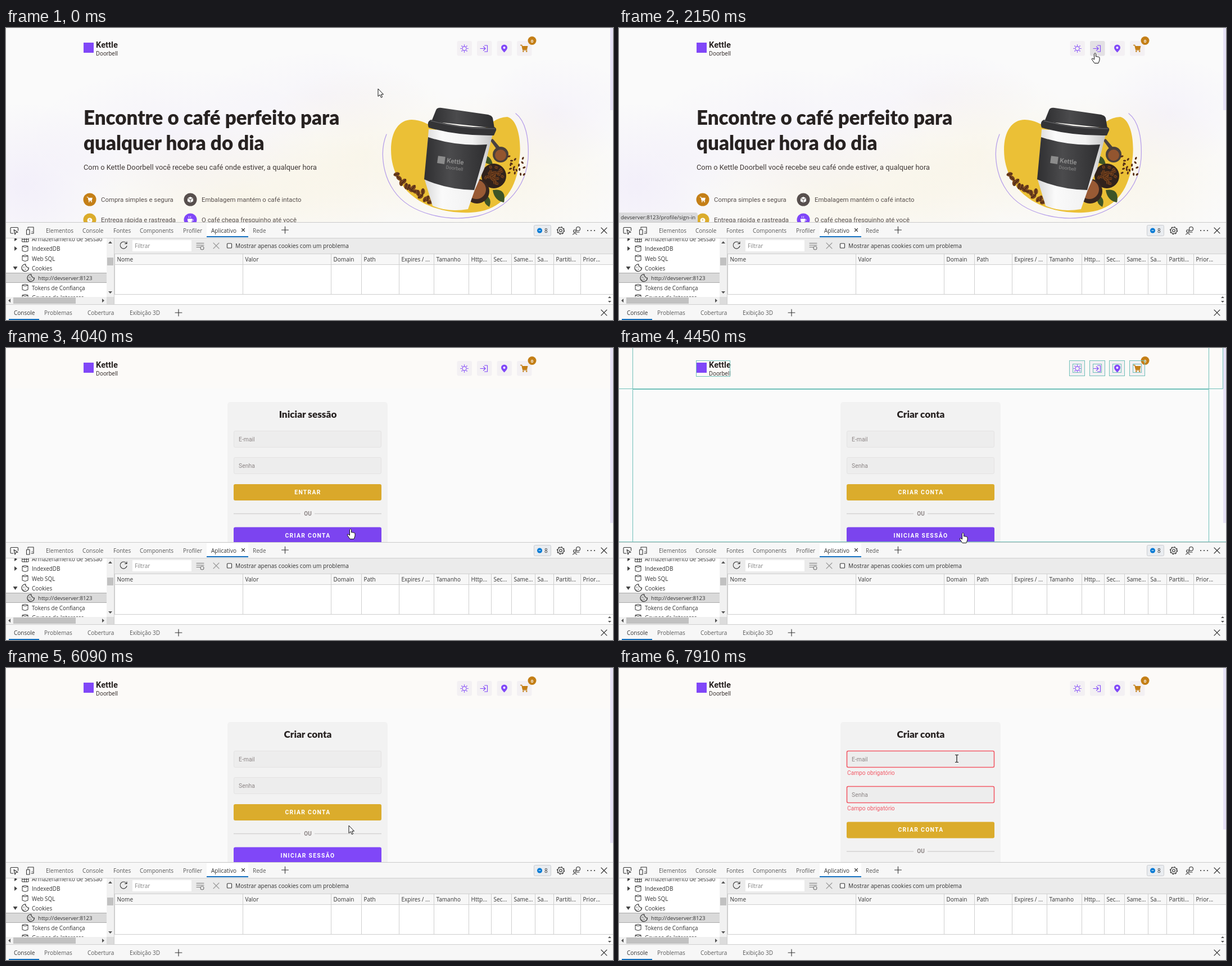
An HTML page that plays this animation: 1080x519 px, repeating every 8 s.

```html
<!DOCTYPE html>
<html lang="pt-BR">
<head>
<meta charset="utf-8">
<title>Iniciar sessão</title>
<style>
html, body { margin: 0; width: 100%; height: 100%; overflow: hidden; background: #fafafa; }
svg { display: block; width: 100%; height: 100%; }
text { font-family: Roboto, sans-serif; white-space: pre; }
.title { font-family: Lato, sans-serif; font-weight: 900; fill: #272221; }
.ui { font-family: "Open Sans", "Noto Sans", sans-serif; fill: #333; }
.btn { font-weight: 700; letter-spacing: 1.3px; text-anchor: middle; fill: #fff; }
.mid { text-anchor: middle; }
.line { fill: none; stroke-linecap: round; stroke-linejoin: round; }
</style>
</head>
<body>
<svg viewBox="0 0 1080 519">
<defs>
  <radialGradient id="violet"><stop stop-color="#8047f8"/><stop offset="1" stop-color="#8047f8" stop-opacity="0"/></radialGradient>
  <radialGradient id="yellow"><stop stop-color="#f0c030"/><stop offset="1" stop-color="#f0c030" stop-opacity="0"/></radialGradient>
  <linearGradient id="paper"><stop stop-color="#d9d9d9"/><stop offset=".25" stop-color="#fafafa"/><stop offset=".7" stop-color="#f2f2f2"/><stop offset="1" stop-color="#c4c4c4"/></linearGradient>
  <linearGradient id="dark"><stop stop-color="#2f2f31"/><stop offset=".4" stop-color="#4b4b4d"/><stop offset="1" stop-color="#2e2e30"/></linearGradient>
  <clipPath id="treeClip"><path d="M0 374H179V478H0Z"/></clipPath>
  <g id="cart"><path class="line" d="M-6.5-6h2.3l2 8.5H4.8" stroke="currentColor" stroke-width="1.4"/><path d="M-4-4.5H6.5L5 1.7H-2.6Z" fill="currentColor"/><circle cx="-1.7" cy="5" r="1.3" fill="currentColor"/><circle cx="4.2" cy="5" r="1.3" fill="currentColor"/></g>
</defs>

<rect width="1080" height="346" fill="#fafafa"/>

<g id="home">
  <g id="glow"></g>
  <text class="title" x="138" y="171.500" font-size="34.900">Encontre o café perfeito para</text>
  <text class="title" x="138" y="216.500" font-size="34.900">qualquer hora do dia</text>
  <text x="138" y="252" font-size="12.850" fill="#403937">Com o Kettle Doorbell você recebe seu café onde estiver, a qualquer hora</text>
  <g id="perks"></g>
  <use href="#cart" transform="translate(149 305) scale(.75)" color="#fff"/>
  <path d="M328 300l5 2.500v5.500l-5 2.500-5-2.500v-5.500z" fill="#fff"/>
  <path class="line" d="M323.500 302.700l4.500 2.300 4.500-2.300M328 305v5" stroke="#574f4d"/>
  <circle cx="149" cy="342" r="4.500" fill="#fff"/><path d="M147.500 335.500h3M149 339.500v3" stroke="#dbac2c" stroke-width="1.300"/>
  <path d="M323 339h8v3q-1 4-4 4t-4-4z" fill="#fff"/><path class="line" d="M331 340q3 0 2 2t-3 1.500M325.500 337v-2M328.500 337v-2" stroke="#fff"/>

  <path d="M686 232C681 190 696 163 722 163C757 164 775 195 810 205C838 208 852 160 892 158C912 163 918 205 913 237C908 290 880 326 827 328C765 331 697 304 686 232Z" fill="#ebc036"/>
  <path class="line" d="M677 189C664 220 671 262 690 289C720 333 790 345 840 334C895 320 925 279 929 232C931 195 924 165 907 152" stroke="#b7a0ea" stroke-width="1.300"/>
  <g fill="#3d5427"><path d="M866 243q-22-2-18-17q15 0 18 17zM858 262q-17 0-14-17q13 3 14 17zM866 288q25-4 20 22q-17-3-20-22zM852 296q14 6 8 22q-13-6-8-22z"/></g>
  <path d="M877 221L861 199l5-2 16 19z" fill="#4a4240"/>
  <circle cx="880" cy="225" r="14" fill="#4b403b"/><circle cx="880" cy="226" r="10" fill="#93552f"/>
  <circle cx="868" cy="263" r="22" fill="#30221c"/>
  <circle cx="838" cy="290" r="22" fill="#382720"/><circle cx="837" cy="287" r="17" fill="#995a34"/>
  <g id="beans"></g>
  <path d="M752 180L866 188 851 250 834 288 822 322Q786 328 759 316L745 270Z" fill="url(#paper)"/>
  <path d="M751 194Q803 211 856 207L833 288Q785 287 744 269Z" fill="url(#dark)"/>
  <path d="M765 146Q767 141 775 142L858 154Q865 156 866 160L869 178 757 166Z" fill="url(#dark)"/>
  <path d="M756 163Q810 179 869 176Q873 178 872 182L868 191Q805 192 752 177Q748 167 756 163Z" fill="#343436"/>
  <path class="line" d="M756 165Q810 180 870 179" stroke="#6c6c6f"/>
  <rect x="768" y="228" width="13" height="13" fill="#8c8c8c" transform="rotate(8 774 234)"/>
  <g transform="rotate(8 784 238)" fill="#8c8c8c"><text x="784" y="239" font-size="11.500" font-weight="700">Kettle</text><text x="784" y="250" font-size="8.300">Doorbell</text></g>
</g>

<g id="form">
  <rect width="1075" height="72" fill="#fcfaf8"/>
  <rect x="394" y="96" width="285" height="270" rx="5" fill="#f2f2f2"/>
  <text id="formTitle" class="title mid" x="537" y="124" font-size="17.200"></text>
  <g id="email"></g>
  <g id="password"></g>
  <g id="errors" fill="#f25b68" font-size="10.200"><text x="406" y="190">Campo obrigatório</text><text x="406" y="252.500">Campo obrigatório</text></g>
  <g id="actions">
    <rect x="405" y="242" width="263" height="29" rx="3" fill="#dbac2c"/>
    <rect id="goldHover" x="405" y="242" width="263" height="29" rx="3" fill="#c47f17"/>
    <text id="goldText" class="btn" x="537" y="259.500" font-size="10.400"></text>
    <path d="M405 294.500h119M549 294.500h119" stroke="#d4d2d2" stroke-width="1.500"/>
    <text class="mid" x="537" y="297.800" font-size="10" font-weight="700" fill="#8d8686">OU</text>
    <rect x="405" y="318.500" width="263" height="29" rx="3" fill="#8047f8"/>
    <rect id="violetHover" x="405" y="318.500" width="263" height="29" rx="3" fill="#4b2995"/>
    <text id="violetText" class="btn" x="537" y="337" font-size="10.400"></text>
  </g>
</g>

<g id="header">
  <rect x="138" y="26" width="18" height="18" fill="#8047f8"/>
  <text x="160" y="35" font-size="14.700" font-weight="700" fill="#272221">Kettle</text>
  <text x="160" y="49" font-size="10.500" fill="#403937">Doorbell</text>
  <g id="tiles" fill="#f3f0f3"></g>
  <rect id="tileHover" x="838" y="23" width="26.500" height="26.500" rx="3" fill="#e3e1e4"/>
  <g class="line" stroke="#8047f8" stroke-width="1.100">
    <circle cx="815.500" cy="36.500" r="3.600"/><g id="rays"></g>
    <path d="M844 36.500h8.500M849.500 33l3.500 3.500-3.500 3.500M851.500 31h5v11h-5"/>
  </g>
  <path d="M886.500 43.500q-5.500-5.500-5.500-8.500a5.500 5.500 0 0 1 11 0q0 3-5.500 8.500z" fill="#8047f8"/><circle cx="886.500" cy="35" r="2" fill="#fff"/>
  <use href="#cart" x="922" y="36.500" color="#c47f17"/>
  <circle cx="936" cy="22.500" r="7.500" fill="#c47f17"/>
  <text class="mid" x="936" y="25.500" font-size="8" font-weight="700" fill="#fff">0</text>
</g>

<rect id="thumb" x="1075" width="5" fill="#e6e1f5"/>
<g id="outline" fill="none" stroke="#70c0b9">
  <path d="M24.500 73.500H1049.500V344.500H24.500Z"/>
  <g id="outlineTop"><path d="M0 72.500H1074.500V0M24.500 0V73M1049.500 0V73M0 344.500H1080"/></g>
</g>
<g id="status"><path d="M0 328H136q4 0 4 4V346H0Z" fill="#dadadc"/><text id="statusText" class="ui" x="3" y="340" font-size="9.550"></text></g>

<g id="tools">
  <rect y="345" width="1080" height="174" fill="#f7f7f7"/>
  <path d="M0 345.500H1080" stroke="#cacaca"/>
  <rect x="357" y="347" width="74" height="26" fill="#fff"/>
  <rect y="373" width="193" height="118" fill="#fff"/>
  <rect x="193" y="373" width="887" height="28" fill="#ebebeb"/>
  <rect x="193" y="420" width="887" height="71" fill="#fff"/>
  <path id="grid" d="M0 373.500H1080M193 401.500H1080M193 420.500H1080M193 473.500H1080M0 491.500H1080M192.500 373V491" stroke="#cfcfcf" fill="none"/>
  <path d="M357 371H431M5 518H59" stroke="#0f6cbd" stroke-width="2"/>
  <rect x="225" y="377" width="105" height="20" fill="#fff"/>
  <rect x="939.500" y="350.500" width="30" height="19" rx="2" fill="#e9ecf0" stroke="#cbcdd0"/>
  <circle cx="949.500" cy="360" r="4.500" fill="#0078d4"/><path d="M947.500 360h4" stroke="#fff"/>
  <rect x="179" y="374" width="13" height="104" fill="#f1f1f1"/><rect x="180" y="408" width="11" height="14" fill="#c1c1c1"/>
  <rect y="478" width="179" height="13" fill="#f1f1f1"/><rect x="13" y="479" width="111" height="11" fill="#c1c1c1"/>
  <rect x="179" y="478" width="13" height="13" fill="#dcdcdc"/>
  <path d="M182 383l3.500-4 3.500 4zM182 468l3.500 4 3.500-4zM8 481v7l-4-3.500zM171 481v7l4-3.500zM1071 480l3-3 3 3zM1071 485l3 3 3-3z" fill="#555"/>
  <g class="line" stroke="#333" stroke-width="1.100">
    <path d="M13 365H9.500q-1.500 0-1.500-1.500V356q0-1.500 1.500-1.500H20q1.500 0 1.500 1.500v4M14 358.500l7 4.500-3.500.5-1.500 3.500z"/>
    <path d="M39 357v-3h10v11h-4M36.500 358.500h5.500v8.500h-5.500zM46 362h1"/>
    <path d="M419.500 356.500l5 5m0-5l-5 5M496.500 353v12M490.500 359h12M307 500v12M301 506h12M1059 355l10 10m0-10l-10 10M1059 501l10 10m0-10l-10 10"/>
    <circle cx="987" cy="360" r="2.300"/><circle cx="987" cy="360" r="5.500"/><circle cx="987" cy="360" r="6.500" stroke-dasharray="2 3.100"/>
    <circle cx="1018" cy="357" r="3.500"/><circle cx="1012" cy="361" r="2.300"/><path d="M1008.500 367q3.500-4 7 0M1015 363h5"/>
    <path d="M1035 360h.1M1041 360h.1M1047 360h.1" stroke-width="2"/>
    <path d="M214 382.500a6 6 0 1 0 1 5M215 380v3.500h-3.500"/>
    <path d="M339 382.500h13M339 386h13M339 389.500h7" stroke="#777"/><circle cx="349" cy="391" r="3" stroke="#777"/>
    <path d="M369 382l10 10m0-10l-10 10" stroke="#999"/>
    <rect x="393.500" y="383" width="8" height="8" rx="1" fill="#fff"/>
  </g>
  <g clip-path="url(#treeClip)">
    <rect x="-1" y="435.500" width="181" height="17" fill="#dadada" stroke="#aaa"/>
    <g id="tree"></g>
    <path d="M15 372l5 3.500-5 3.500zM15 388l5 4-5 4zM12.500 424h8l-4 6z" fill="#444"/>
    <path class="line" d="M29 371h11v9H29zM29 375.500h11M32.700 371v9M36.400 371v9" stroke="#333"/>
  </g>
  <g id="labels"></g>
</g>

<g id="arrow"><path d="M0 0V13.500L3.200 10.700 5.500 15.700 7.600 14.700 5.400 10H9.500Z" fill="#fff" stroke="#111"/></g>
<g id="hand"><path d="M-1.500 1.800q1.500-2.600 3 0V7q1.300-1.200 2.400.2q1.300-.9 2.300.4q1.600-.3 1.800 1.300V13L6 18.500H-1L-5.500 12q-.7-2.400 1.300-2L-1.500 12Z" fill="#fff" stroke="#111" stroke-linejoin="round"/></g>
<g id="beam"><path d="M-3-6.500h2l1 .5 1-.5h2M0-6V6M-3 6.500h2l1-.5 1 .5h2" fill="none" stroke="#111" stroke-width="1.200"/></g>
</svg>

<script>
const $ = id => document.getElementById(id);
const fill = (id, parts) => $(id).innerHTML += parts.join('');
const show = (id, on) => $(id).style.display = on ? '' : 'none';
const label = (x, y, s, size = 10, more = '') => `<text class="ui" x="${x}" y="${y}" font-size="${size}" ${more}>${s}</text>`;
const box = (x, y, w, h = w, rx = 0) => `<rect x="${x}" y="${y}" width="${w}" height="${h}" rx="${rx}"/>`;

// Landing page
fill('glow', [
  ['violet', 30, 280, 180, 150, .06], ['violet', 300, 190, 260, 120, .04], ['violet', 560, 120, 200, 80, .03],
  ['yellow', 430, 300, 300, 130, .08], ['yellow', 640, 220, 200, 150, .07], ['yellow', 880, 260, 230, 150, .08],
  ['violet', 980, 150, 140, 100, .04]
].map(([c, x, y, rx, ry, o]) => `<ellipse cx="${x}" cy="${y}" rx="${rx}" ry="${ry}" fill="url(#${c})" opacity="${o}"/>`));
fill('perks', [
  [149, 305, '#c47f17', 'Compra simples e segura'], [328, 305, '#574f4d', 'Embalagem mantém o café intacto'],
  [149, 341, '#dbac2c', 'Entrega rápida e rastreada'], [328, 341, '#8047f8', 'O café chega fresquinho até você']
].map(([x, y, c, s]) => `<circle cx="${x}" cy="${y}" r="11.500" fill="${c}"/><text x="${x + 20}" y="${y + 4}" font-size="11.400" fill="#574f4d">${s}</text>`));

let seed = 7;
const random = () => (seed = seed * 16807 % 2147483647) / 2147483647;
const bean = (x, y, r) => `<g transform="translate(${x} ${y}) rotate(${random() * 180})"><ellipse rx="${r}" ry="${r * .68}" fill="#75431f"/><path d="M${-r} 0H${r}" stroke="#3a2013"/></g>`;
const pile = (n, place) => fill('beans', Array.from({ length: n }, (_, i) => bean(...place(i / n))));
pile(16, u => [695 + u * 68, 267 + u * 42 + (random() - .5) * 14, 5.5]);
pile(34, () => { const a = random() * 6.3, r = random() * 17; return [868 + r * Math.cos(a), 262 + r * Math.sin(a), 3.5]; });
pile(18, () => [894 + random() * 28, 224 + random() * 38, 2.5]);

// Header
const tiles = [802.5, 838, 873.5, 909];
fill('tiles', tiles.map(x => box(x, 23, 26.5, 26.5, 3)));
fill('rays', [0, 1, 2, 3, 4, 5, 6, 7].map(i => `<path d="M815.500 31.200v-1.400" transform="rotate(${i * 45} 815.500 36.500)"/>`));
fill('outlineTop', [box(137.5, 22.5, 60, 28), ...tiles.map(x => box(Math.floor(x) - .5, 22.5, 27) + box(Math.floor(x) + 5.5, 28.5, 15))]);

// Form fields
for (const [id, y, s] of [['email', 147.5, 'E-mail'], ['password', 194.5, 'Senha']])
  fill(id, [`<g fill="#ededed">${box(405.5, y, 262, 29, 2.5)}</g><text x="414" y="${y + 18}" font-size="10.400" fill="#8d8686">${s}</text>`]);

// Developer panel
const columns = [193, 421, 578, 632, 699, 761, 823, 863, 899, 941, 974, 1022];
const heads = ['Nome', 'Valor', 'Domain', 'Path', 'Expires / ...', 'Tamanho', 'Http...', 'Sec...', 'Same...', 'Sa...', 'Partiti...', 'Prior...'];
$('grid').setAttribute('d', $('grid').getAttribute('d') + columns.map(x => `M${x + .5} 401V473`).join(''));
const row = (y, list, more) => list.map(([x, s]) => label(x, y, s, 10, more));
const dim = 'opacity=".8"';
fill('labels', [
  ...heads.map((s, i) => label(columns[i] + 4.5, 415, s)),
  ...row(364, [[71, 'Elementos'], [136, 'Console'], [191, 'Fontes'], [238, 'Components'], [315, 'Profiler'], [439, 'Rede']], dim),
  ...row(364, [[365, 'Aplicativo'], [958, '8']]),
  label(229, 391, 'Filtrar', 10, 'opacity=".6"'), label(408, 391, 'Mostrar apenas cookies com um problema', 10.15),
  label(14, 510, 'Console'),
  ...row(510, [[68, 'Problemas'], [145, 'Cobertura'], [220, 'Exibição 3D']], dim)
]);
const drum = (x, y) => `<path class="line" d="M${x} ${y - 4}v8q5 3 10 0v-8q-5-3-10 0q5 3 10 0" stroke="#333"/>`;
const cookie = (x, y) => `<path class="line" d="M${x + 1} ${y - 6}a6.300 6.300 0 1 0 5.500 6q-3 1-3.500-2q-3-.5-2-4M${x - 3} ${y - 1}h1M${x} ${y + 3}h1M${x - 3} ${y + 3}h.1M${x} ${y}h.1" stroke="#333" stroke-width="1.200"/>`;
const branches = [[379, 'Armazenamento de Sessão'], [396, 'IndexedDB'], [413.5, 'Web SQL'], [431, 'Cookies'], [466, 'Tokens de Confiança'], [483, 'Grupos de Interesse']];
fill('tree', [
  ...branches.map(([y, s]) => label(46, y, s, 9.9)), label(57, 448, 'http://devserver:8123', 9.6),
  ...[392, 409, 461, 479].map(y => drum(29, y)), cookie(34, 426), cookie(44, 444)
]);

// Timeline
const LOOP = 8000, LOGIN = 2220, SIGNUP = 4440, FAIL = 7230;
const path = [
  [0, 662, 108], [720, 662, 108], [1150, 762, 75], [1540, 842, 51], [1750, 848, 42], [2150, 848, 44], [2220, 843, 46],
  [3205, 843, 46], [3450, 790, 100], [3750, 665, 250], [3970, 613, 318], [4200, 612, 328], [4910, 612, 328],
  [5120, 610, 321], [5500, 610, 321], [5900, 612, 290], [6270, 608, 263], [6410, 608, 258], [6550, 608, 258],
  [6820, 608, 247], [7220, 608, 247], [7500, 604, 190], [7770, 601, 167], [7900, 601, 161], [8000, 601, 161]
];
const pointers = [
  [0, 'arrow'], [1590, 'hand'], [3260, 'arrow'], [3720, 'hand'], [3810, 'arrow'], [4010, 'hand'], [5570, 'arrow'],
  [6160, 'hand'], [FAIL, 'arrow'], [7260, 'beam'], [7410, 'arrow'], [7660, 'beam']
];
const links = [
  [0, ''], [1680, 'sign-in'], [LOGIN, ''], [4110, 'sign-up'], [SIGNUP, ''], [4650, 'sign-in'], [5590, '']
];
const latest = (list, t) => list.findLast(e => e[0] <= t)[1];
const within = (t, a, b) => t >= a && t < b;
const ramp = (t, from) => Math.max(0, Math.min(1, (t - from) / 250));
const fade = (t, on, off) => ramp(t, on) - ramp(t, off);

function pointerAt(t) {
  // the pointer was sampled about 14 times a second
  t = Math.max(0, 780 + Math.floor((t - 765) / 69.2) * 69.2);
  const i = path.findIndex(p => p[0] > t);
  const [t0, x0, y0] = path[i - 1], [t1, x1, y1] = path[i];
  const u = (t - t0) / (t1 - t0);
  return [x0 + (x1 - x0) * u, y0 + (y1 - y0) * u];
}

function draw(t) {
  const signup = t >= SIGNUP, failed = t >= FAIL;
  show('home', t < LOGIN);
  show('form', t >= LOGIN);
  $('thumb').setAttribute('height', t < LOGIN ? 146 : failed ? 287 : 311);

  $('formTitle').textContent = signup ? 'Criar conta' : 'Iniciar sessão';
  $('goldText').textContent = signup ? 'CRIAR CONTA' : 'ENTRAR';
  $('violetText').textContent = signup ? 'INICIAR SESSÃO' : 'CRIAR CONTA';
  show('errors', failed);
  $('password').setAttribute('transform', `translate(0 ${failed ? 16 : 0})`);
  $('actions').setAttribute('transform', `translate(0 ${failed ? 31.5 : 0})`);
  for (const id of ['email', 'password']) {
    $(id).firstChild.setAttribute('stroke', failed ? '#f25b68' : '#e4e3e3');
    $(id).firstChild.setAttribute('stroke-width', failed ? 1.6 : 1);
  }

  $('tileHover').style.opacity = fade(t, 1600, 3260);
  $('goldHover').style.opacity = fade(t, 3720, 3810) + fade(t, 6160, FAIL);
  $('violetHover').style.opacity = signup ? fade(t, 4425, 5570) : ramp(t, 4020);

  show('outline', within(t, LOGIN, 2480) || within(t, SIGNUP, 4710) || within(t, FAIL, 7500));
  show('outlineTop', !failed);
  const link = latest(links, t);
  show('status', link);
  $('statusText').textContent = 'devserver:8123/profile/' + link;

  const kind = latest(pointers, t), [x, y] = pointerAt(t);
  for (const id of ['arrow', 'hand', 'beam']) show(id, id === kind);
  $(kind).setAttribute('transform', `translate(${Math.round(x)} ${Math.round(y)})`);
}

const start = performance.now();
function tick() {
  draw((performance.now() - start) % LOOP);
  requestAnimationFrame(tick);
}
tick();
</script>
</body>
</html>
```
